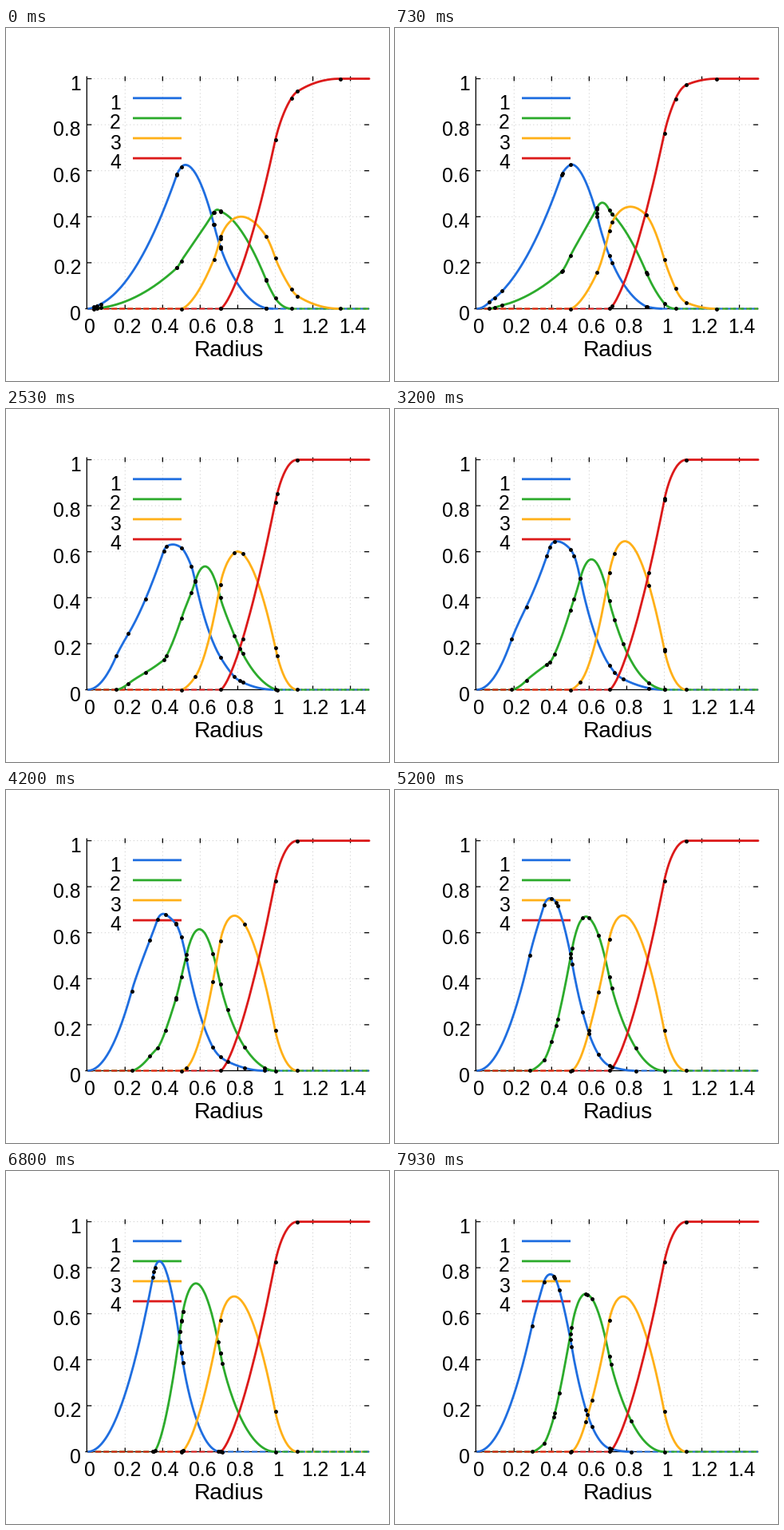
These frames come from a looping animation (480 by 442 pixels, 8000 ms). A matplotlib script:

```python
import numpy as np
import matplotlib.pyplot as plt
from matplotlib.animation import FuncAnimation

W, H, DPI = 480, 442, 100
FRAMES, INTERVAL = 160, 50
PX = 72 / DPI                      # points per pixel
COLORS = ["#1f6ee0", "#2cab2c", "#ffb018", "#dc1a1a"]
X0, XS, Y0, YS = 102.2, 235.3, 351.5, 288
LEFT = 101.3

plt.rcParams["font.family"] = "Liberation Sans"
plt.rcParams["path.snap"] = False
fig = plt.figure(figsize=(W / DPI, H / DPI), dpi=DPI, facecolor="white")
ax = fig.add_axes([0, 0, 1, 1])
ax.set_xlim(0, W)
ax.set_ylim(H, 0)
ax.axis("off")


def sx(r):
    return X0 + XS * np.asarray(r)


def sy(v):
    return Y0 - YS * np.asarray(v)


def line(xs, ys, color="black", width=1.3, **kw):
    kw.setdefault("solid_capstyle", "butt")
    return ax.plot(xs, ys, color=color, lw=width * PX, **kw)[0]


def label(x, y, s, size=24.8, ha="center"):
    ax.text(x, y, s, fontsize=size * PX, ha=ha, va="center_baseline", color="black")


# grid, ticks and labels
TOP, RIGHT = sy(1), sx(1.5)
for i in range(8):
    x = sx(0.2 * i)
    if i:
        line([x, x], [TOP, Y0], "#c8c8c8", 1, ls=(0, (1, 3.5)), zorder=0)
        line([x, x], [Y0, Y0 - 5])
        line([x, x], [TOP - 3, TOP + 3])
    label(x + 3, 372, f"{0.2 * i:.1g}" if i < 6 else f"{0.2 * i:.1f}")
for i in range(6):
    y = sy(0.2 * i)
    if i:
        line([LEFT, RIGHT], [y, y], "#c8c8c8", 1, ls=(0, (1, 3.5)), zorder=0)
    line([LEFT, LEFT + 6], [y, y])
    line([RIGHT - 6, RIGHT], [y, y])
    label(94, y + 4.5, f"{0.2 * i:.1g}", ha="right")
line([LEFT, LEFT], [TOP - 3, Y0])
line([LEFT - 2, RIGHT], [Y0, Y0])
label(279, 401.3, "Radius", 28)
for i, c in enumerate(COLORS):
    label(137, 92 + 25 * i, str(i + 1))
    line([159, 220], [87.8 + 25.1 * i] * 2, c, 2.8, zorder=2)

# distances from sample points of the unit cell to its four corners
N, STEP, BINS = 400, 0.005, 300
CORNERS = np.array([(0, 0), (1, 0), (0, 1), (1, 1)], float)
mid = (np.arange(N) + 0.5) / N
gu, gv = np.meshgrid(mid, mid)
keep = gu > gv
gu, gv = gu[keep], gv[keep]
near = np.sort([np.hypot(gu - a, gv - b) for a, b in CORNERS], axis=0)
R = np.arange(BINS + 1) * STEP


def share(d):
    """Part of the cell with distance below each radius."""
    n = np.bincount((d / STEP).astype(int), minlength=BINS)[:BINS]
    return np.concatenate([[0], np.cumsum(n)]) / d.size


def densities(s):
    """Share covered once, twice, three times, and at least four times."""
    b = np.hypot(gu - s, gv - s)
    cover = [share(np.minimum(near[0], b))]
    for k in range(1, 4):
        cover.append(share(np.maximum(near[k - 1], np.minimum(near[k], b))))
    return [cover[k] - cover[k + 1] for k in range(3)] + [cover[3]]


def knots(s):
    """Radii where a density changes its formula, with the curves involved."""
    v = (1 - 2 * s * s) / (2 * (1 - s))
    q = 1 - s
    u = 1 - (1 - 2 * q * q) / (2 * s)
    w = (1 + 2 * s - 2 * s * s) / (2 * q)
    c = (1 - 2 * s * s) / (2 * max(1 - 2 * s, 1e-6))
    moving = [(s / 2, s / 2), ((1 + s) / 2,) * 2, ((1 + s) / 2, s / 2),
              (0, s), (1, s), (0, 0), (1, 1), (1, 0),
              (0.5, 0.5 + s), (c, c), (0, v), (1, u), (1, w)]
    spots = [(p, np.hypot(p[0] - s, p[1] - s)) for p in moving]
    spots = [(p, r) for p, r in spots
             if 0 <= min(p) and max(p) <= 1
             and not (p == (1, 1) and 1 < r < 1.118)]
    spots += [((0.5, 0), 0.5), ((0.5, 0.5), 0.5 ** 0.5),
              ((0, 0), 1), ((0.5, 1), 1.25 ** 0.5)]
    for p, r in spots:
        d = np.hypot(*(np.vstack([CORNERS, (s, s)]) - p).T)
        below = int((d < r - 1e-6).sum())
        upto = int((d < r + 1e-6).sum())
        for k in range(max(below, 1), min(upto, 4) + 1):
            yield r, k - 1


# dashes along the axis where a density is zero; green and red lie on top
flat = [line([], [], c, 2, ls=(0, (3.5, 1.5)), zorder=z)
        for c, z in zip(COLORS, (3.1, 3.2, 3, 3.3))]
solid = [line([], [], c, 2.8, zorder=4 + 0.1 * i, solid_capstyle="round")
         for i, c in enumerate(COLORS)]
dots = ax.plot([], [], "o", color="black", ms=4.9 * PX, mew=0, zorder=6)[0]


def draw(i):
    t = i * INTERVAL / 1000
    s = 0.049 + 0.0675 * t
    s = min(s, 1 - s)
    curves = densities(s)
    for f, z, o in zip(curves, flat, solid):
        live = f > 2e-4
        wide = live.copy()
        wide[1:] |= live[:-1]
        wide[:-1] |= live[1:]
        z.set_data(sx(R), np.where(live, np.nan, Y0))
        o.set_data(sx(R), np.where(wide, sy(f), np.nan))
    marks = [(sx(r), sy(np.interp(r, R, curves[k]))) for r, k in knots(s)]
    dots.set_data(*zip(*marks))
    return [*flat, *solid, dots]


anim = FuncAnimation(fig, draw, frames=FRAMES, interval=INTERVAL,
                     repeat=True, repeat_delay=0, blit=False)
plt.show()
```
